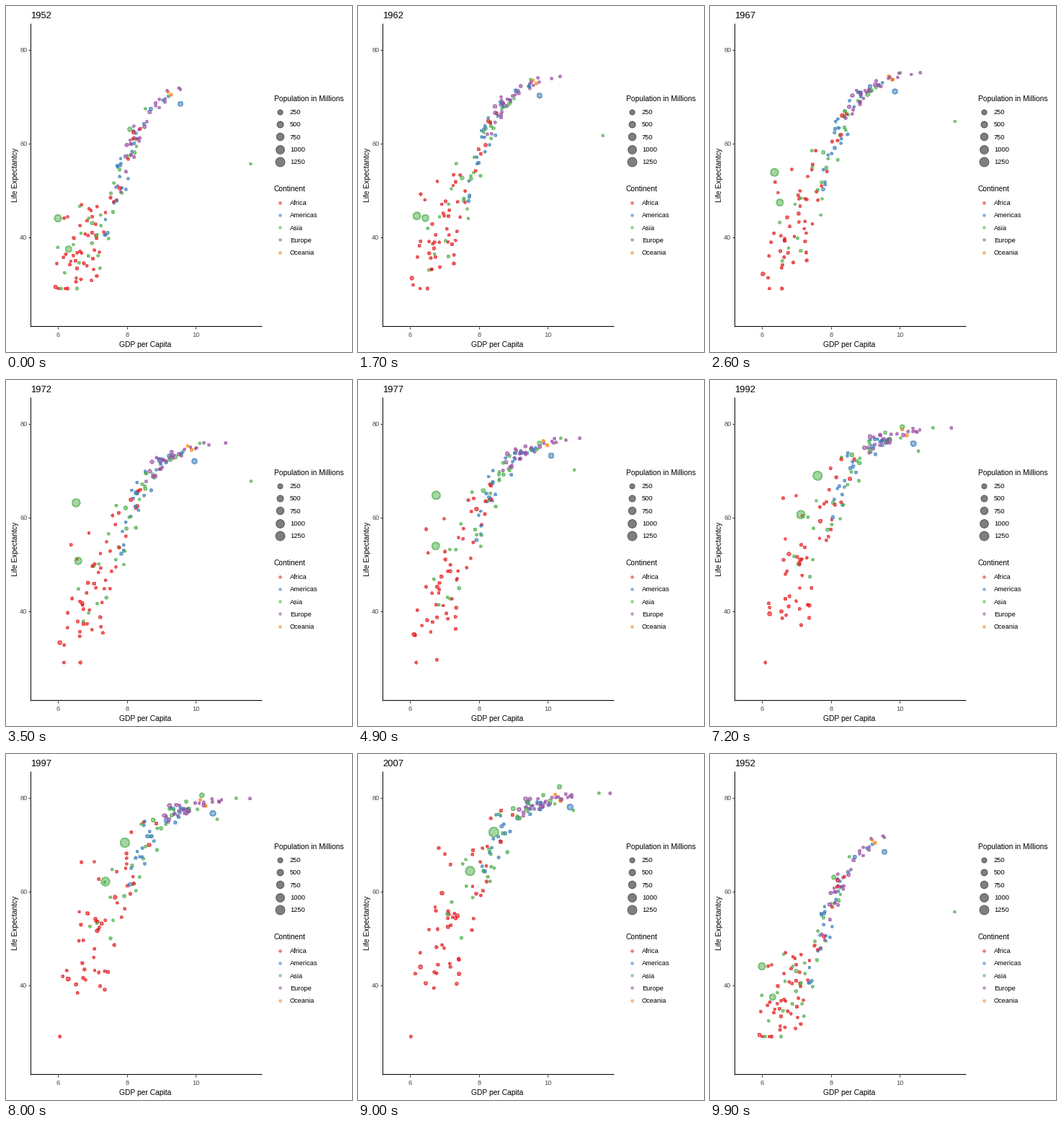
These frames come from a looping animation (480x480 px, 10 s). A matplotlib script:

```python
import numpy as np
import matplotlib.pyplot as plt
from matplotlib.animation import FuncAnimation
from matplotlib.colors import to_rgba

plt.rcParams["font.family"] = "Liberation Sans"

SIDE, DPI = 480, 80
PT = 72 / DPI                      # points per pixel
FRAMES, STEP = 100, 100
STATES = 12                        # 1952 to 2007, every five years
TOP_POP = 1319

COLORS = {"Africa": "#E41A1C", "Americas": "#377EB8", "Asia": "#4DAF4A",
          "Europe": "#984EA3", "Oceania": "#FF7F00"}

# Frames in which a move starts, and how many frames each move takes
STARTS = np.array([5, 14, 23, 32, 41, 49, 56, 64, 72, 80, 88, 96])
LENGTHS = np.where(STARTS == 49, 3, 4)

years = np.linspace(1952, 2007, STATES)
t01 = np.linspace(0, 1, STATES)
rng = np.random.default_rng(7)


def mix(a, b, t=t01):
    return a + (b - a) * t


def px(gdp):
    return 72.5 + 47.75 * (gdp - 6)


def py(life):
    return 60.5 + 6.5 * (80 - life)


def radius(pop):
    size = 1 + 5 * np.sqrt(pop / TOP_POP)
    return 0.375 * (size * 72 / 25.4 + 0.945) - 0.15


dots = []                          # (colour, x, y, radius) over the states


def add(land, gdp, life, pop, rise):
    dots.append((COLORS[land], px(gdp), py(life), radius(pop * rise ** t01)))


# The most conspicuous countries: population, its growth,
# then key points (year, log GDP, life expectancy)
LEADERS = [
    ("Asia", 556, 2.37, [(1952, 5.99, 44), (1957, 6.36, 50.5),
                         (1962, 6.19, 44.5), (1972, 6.52, 63.1),
                         (1982, 6.87, 65.5), (2007, 8.51, 73)]),
    ("Asia", 372, 2.98, [(1952, 6.3, 37.4), (1972, 6.58, 50.7),
                         (1992, 7.06, 60.2), (2007, 7.8, 64.7)]),
    ("Asia", 86, 1.48, [(1952, 8.08, 63), (1977, 9.72, 75.4),
                        (2007, 10.36, 82.6)]),
    ("Asia", 0.2, 12, [(1952, 11.59, 55.6), (1972, 11.6, 67.7),
                       (1982, 10.35, 71.3), (2007, 10.76, 77.6)]),
    ("Americas", 158, 1.9, [(1952, 9.55, 68.4), (2007, 10.67, 78.2)]),
]
for land, pop, rise, keys in LEADERS:
    when, gdp, life = zip(*keys)
    add(land, np.interp(years, when, gdp), np.interp(years, when, life),
        pop, rise)


def expected_life(gdp):
    """S-curve from wealth to life expectancy, rising over the years."""
    low, high = mix(33, 42), mix(73, 81)
    return low + (high - low) / (1 + np.exp(-(gdp - 7.85) / mix(0.5, 0.65)))


def normals(n):
    z = rng.standard_normal(n)
    return np.clip((z - z.mean()) / z.std(), -2, 2)


# Count, typical log GDP at start and end, and its spread
CLOUDS = {"Africa": (52, 6.8, 7.25, 0.58), "Americas": (24, 7.9, 8.9, 0.45),
          "Asia": (29, 7.1, 8.6, 0.72), "Europe": (30, 8.4, 9.9, 0.45),
          "Oceania": (2, 9.23, 10.29, 0.04)}
SKEW = 0.3
turn = 0.8 * t01
for land, (n, first, last, spread) in CLOUDS.items():
    a, b, c, d, e = (normals(n) for _ in range(5))
    for i in range(n):
        u = a[i] * np.cos(turn) + b[i] * np.sin(turn)
        v = c[i] * np.cos(turn) + d[i] * np.sin(turn)
        u += rng.normal(0, 0.08, STATES)
        gdp = (mix(first, last, t01 ** 0.6)
               + spread * mix(1, 1.3) * (np.exp(SKEW * u) - 1) / SKEW)
        life = expected_life(gdp)
        life += v * mix(0.14, 0.3) * (mix(74, 82) - life)
        pop = min(np.exp(1.1 + 1.25 * e[i]), 60)
        add(land, gdp, np.maximum(life, 29), pop, 2.3)

dots = [dots[i] for i in rng.permutation(len(dots))]
hues = [to_rgba(d[0], 0.5) for d in dots]
X, Y, R = (np.array([d[k] for d in dots]).T for k in (1, 2, 3))

fig = plt.figure(figsize=(SIDE / DPI, SIDE / DPI), dpi=DPI, facecolor="white")
ax = fig.add_axes([0, 0, 1, 1])
ax.set(xlim=(0, SIDE), ylim=(SIDE, 0))
ax.axis("off")


def area(r):
    return (2 * np.asarray(r) * PT) ** 2


def circles(x, y, r, color):
    return ax.scatter(x, y, s=area(r), facecolors=color, edgecolors=color,
                      linewidths=PT, antialiased=False)


def label(x, y, text, size=10.3, color="black", **kw):
    kw = {"ha": "left", "va": "baseline", **kw}
    return ax.text(x, y, text, fontsize=size * PT, color=color, **kw)


def line(x, y, color="black"):
    ax.plot(x, y, color=color, lw=PT, solid_capstyle="butt")


# Axes
SMALL, GREY = 9.3, "#4D4D4D"
line([34, 34], [24, 445])
line([34, 355], [444, 444])
for g in (6, 8, 10):
    line([px(g) - 0.5] * 2, [445, 448], "#333333")
    label(px(g), 459, str(g), SMALL, GREY, ha="center")
for e in (40, 60, 80):
    line([31, 34], [py(e) + 0.5] * 2, "#333333")
    label(29.5, py(e) + 4, str(e), SMALL, GREY, ha="right")
label(193.5, 473, "GDP per Capita", ha="center")
label(18, 234, "Life Expectantcy", ha="right", va="center", rotation=90)
title = label(34.5, 17, "1952", 13)

# Legends
label(372, 132, "Population in Millions")
label(372, 257, "Continent")
for i, (land, color) in enumerate(COLORS.items()):
    pop = 250 * (i + 1)
    entries = [(146.7, str(pop), radius(pop), "black"),
               (272.6, land, 1.8, color)]
    for top, text, r, hue in entries:
        y = top + 17.28 * i
        circles(380, y, r, to_rgba(hue, 0.5))
        label(394, y + 3.5, text, SMALL)

cloud = circles(X[0], Y[0], R[0], hues)


def draw(frame):
    pos = np.clip((frame - STARTS + 1) / LENGTHS, 0, 1).sum()
    now, t = int(pos) % STATES, pos % 1
    x, y, r = (mix(m[now], m[(now + 1) % STATES], t) for m in (X, Y, R))
    cloud.set_offsets(np.column_stack([x, y]))
    cloud.set_sizes(area(r))
    title.set_text(str(1952 + 5 * (int(pos + 0.5) % STATES)))
    return cloud, title


anim = FuncAnimation(fig, draw, frames=FRAMES, interval=STEP, repeat=True,
                     repeat_delay=0, blit=False)
plt.show()
```
